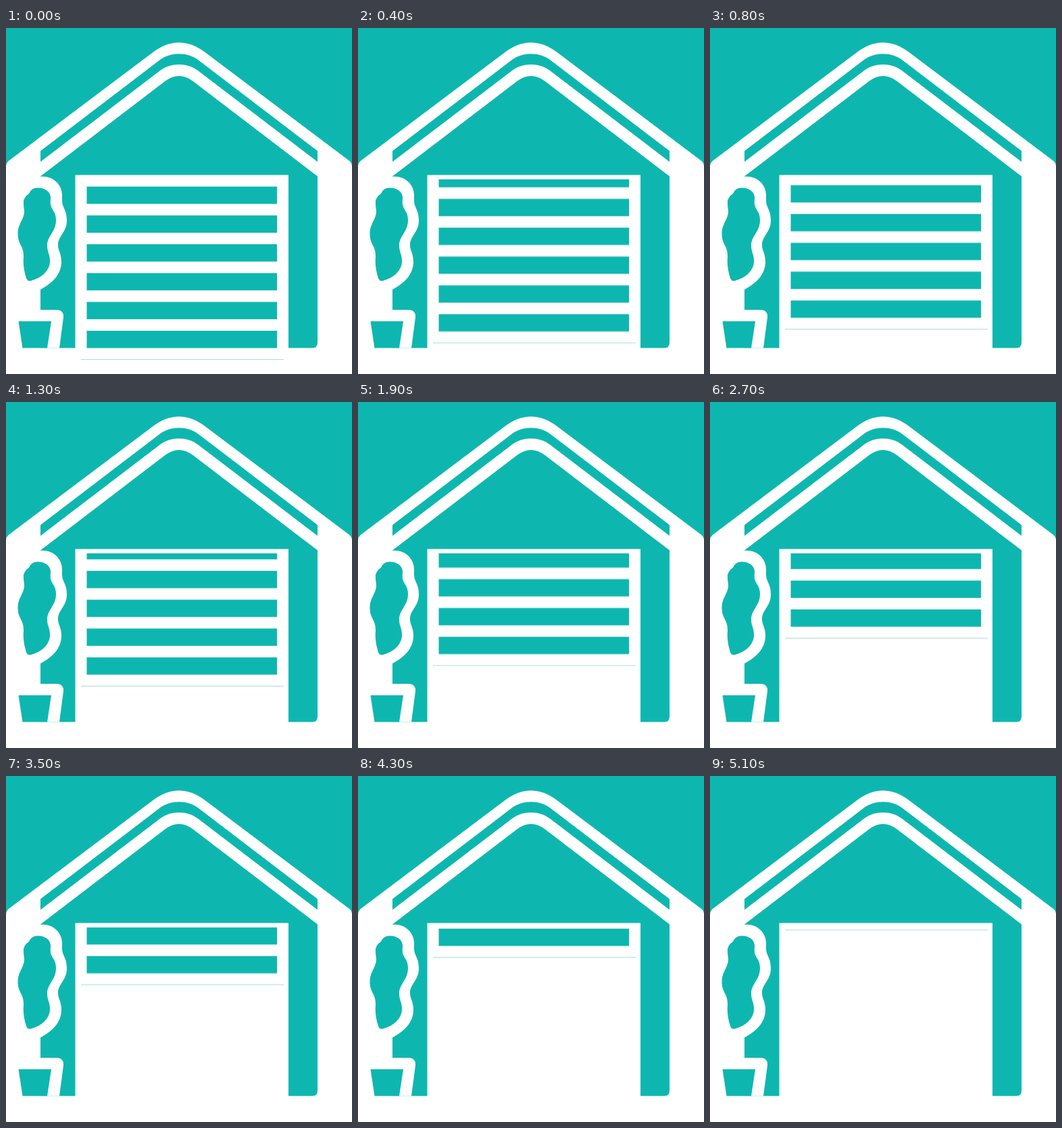
Animation, 512 px wide and 512 px high, one loop 5.2 s. Source, as an HTML page:

```html
<!DOCTYPE html>
<html lang="en">
<head>
<meta charset="utf-8">
<title>Garage door</title>
<style>
  html, body { margin: 0; width: 100%; height: 100%; overflow: hidden; background: #0db7af; }
  svg { display: block; width: 100vw; height: 100vh; }
  .w { fill: #fff; }
  .t { fill: #0db7af; }
  .edge { fill: #a3dfdb; shape-rendering: crispEdges; }

  /* The door holds for one tick, then rises in even 100 ms ticks. */
  .door { animation: rise 5200ms infinite; }
  @keyframes rise {
    0% { transform: translateY(0); animation-timing-function: step-end; }
    1.92308% { transform: translateY(-9.33px); animation-timing-function: steps(51, end); }
    100% { transform: translateY(-267.75px); }
  }
</style>
</head>
<body>
<svg viewBox="0 0 512 512">
  <defs>
    <clipPath id="opening"><rect x="102" y="224" width="316" height="288"/></clipPath>
    <rect id="slat" x="119.5" y="234.67" width="281.6" height="25.6"/>
  </defs>

  <rect class="t" width="512" height="512"/>

  <!-- house outline, roof gap and wall -->
  <path class="w" d="M0 512V205Q0 199 6 195L218 35.5C242.6 16.8 269.4 16.8 294 35.5L506 195Q512 199 512 205V512Z"/>
  <path class="t" d="M51 182L228 47C243.2 35.4 268.8 35.4 284 47L461 182V198L284 63C268.3 51 243.7 51 228 63L51 198Z"/>
  <path class="t" d="M51 219.5L235 79C249 68.3 263 68.3 277 79L461 219.5V465.5Q461 473.6 453 473.6H51Z"/>

  <!-- plant -->
  <path class="w" d="M50 220C70 218 84 232 83 250C82 268 90 266 90 285C90 302 77 308 77 321C77 330 82 333 82 346C82 365 68 378 51 387H50Z"/>
  <path class="t" d="M46 236.5C58 236 67 243 66 253C64 270 74 268 74 284C74 302 61 307 61 322C61 332 65 334 65 345C65 361 49 371 37 374Q31 375 30 370C27 361 25 350 26 340C27 322 18 322 17.5 305C17 290 28 282 27 270C26 263 26 261 26 256Q27 250 34 245Q37 237 46 236.5Z"/>
  <path class="w" d="M50 417H76Q86 418 85 428L79 473.6H50Z"/>
  <path class="t" d="M18.5 434H67L61 473.6H24.5Z"/>

  <!-- garage opening and door -->
  <rect class="w" x="102.5" y="217.5" width="315.5" height="257"/>
  <g clip-path="url(#opening)">
    <g class="door">
      <g class="t">
        <use href="#slat"/>
        <use href="#slat" y="42.67"/>
        <use href="#slat" y="85.33"/>
        <use href="#slat" y="128"/>
        <use href="#slat" y="170.67"/>
        <use href="#slat" y="213.33"/>
      </g>
      <rect class="edge" x="111" y="490.42" width="300" height="1"/>
    </g>
  </g>
</svg>
</body>
</html>
```
